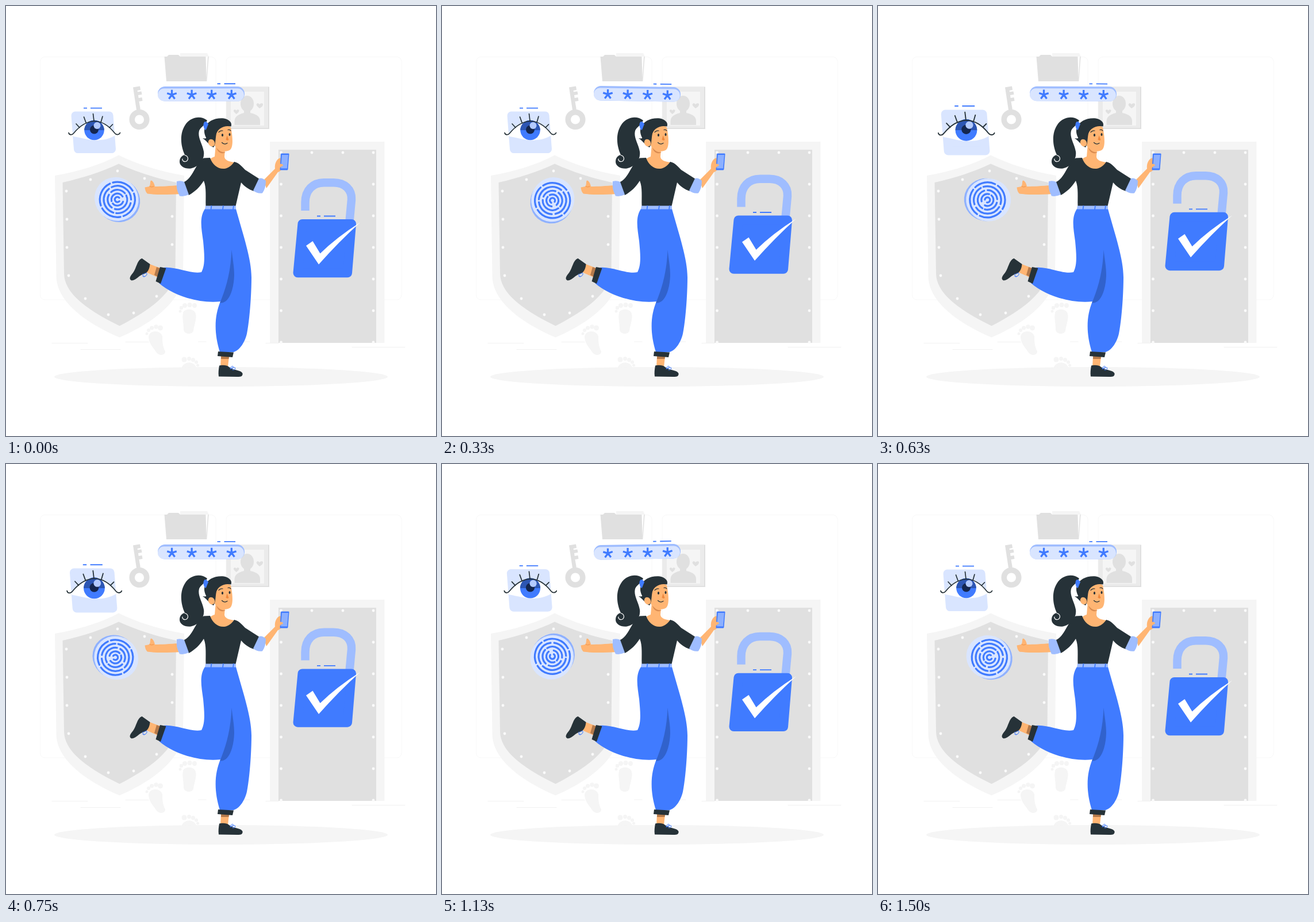
These frames come from a looping animation (748 by 748 pixels, 1540 ms). An HTML page:

```html
<!DOCTYPE html>
<html lang="en">
<head>
<meta charset="utf-8">
<title>Security</title>
<style>
html, body { margin: 0; width: 100%; height: 100%; overflow: hidden; background: #fff; }
svg { display: block; width: 100%; height: 100%; }
.b { fill: #407bff; } .m { fill: #9fbdff; } .l { fill: #d9e5ff; }
.k { fill: #263238; } .s { fill: #ffb573; } .w { fill: #fff; }
.g { fill: #e0e0e0; } .p { fill: #f5f5f5; } .q { fill: #ebebeb; }
.line { fill: none; stroke-linecap: round; stroke-linejoin: round; }
.blue { stroke: #407bff; } .dark { stroke: #263238; }
.dash { fill: none; stroke: #407bff; stroke-width: 1.8; }
</style>
</head>
<body>
<svg viewBox="0 0 748 748">
  <g class="line" stroke="#f8f8f8">
    <rect x="59.500" y="88.500" width="305.500" height="422.500" rx="8"/>
    <rect x="383" y="88.500" width="305" height="422.500" rx="8"/>
  </g>
  <path class="line" stroke="#f1f1f1" d="M80 586.500H142M130 597.500H199M208 584.500H248M335 584H348M410 584H424M452 586.500H474M602 593.500H694"/>

  <!-- folder -->
  <path class="p" d="M303 82H350L353 88L350 131H300z"/>
  <path class="g" d="M275.500 88H280L283 85H300L303 88H352.500L349 131H279z"/>
  <path class="w" d="M347.500 88H351L348.500 125z"/>

  <!-- key -->
  <path class="g" d="M221 141.500L233 139.500L234 146L228.500 147L229 149.500L235.500 148.500L236.500 154L230 155L230.700 160L236.500 159L237.500 165L231.500 166L234 181H227z"/>
  <circle cx="232" cy="197.500" r="12.800" fill="none" stroke="#e0e0e0" stroke-width="9.500"/>

  <!-- portrait -->
  <path class="g" d="M383 140.500H458V214H383z"/>
  <path class="q" d="M383 140.500H456V212H383z"/>
  <path class="p" d="M391 149H449V208H391z"/>
  <g class="g">
    <ellipse cx="419.500" cy="170" rx="11.500" ry="14"/>
    <path d="M414 178H425V186C435 188 442 192 442 200V207H397.500V200C398 192 405 188 414 186z"/>
    <path d="M400.500 188C396 184 395.500 182.500 396 181.500C397 179.500 400 180 400.500 182C401.500 180 404.500 179.500 405.500 181.500C406 183 404 186 400.500 188z"/>
    <path d="M441 178C436 174 435 172 436 170.500C437 168.500 440 169 441 171.500C442 169 446 168.500 447 170.500C447.500 173 445 176 441 178z"/>
  </g>

  <!-- shield -->
  <path class="p" d="M196 259.500C232 277 270 288 310 295L308 467C307 512 255 552 197.500 576.500C140 552 88 515 87.500 470L85 295C125 288 163 277 196 259.500z"/>
  <path class="g" d="M196 274.500C228 289 260 299 296 307L294.500 464C292 500 245 532 197.500 556.500C148 532 102 503 101 466L98.500 307C133 299 166 289 196 274.500z"/>

  <!-- door -->
  <path class="p" d="M459 236H658.500V586H459z"/>
  <path class="g" d="M474 250H644V586H474z"/>
  <g id="rivets" fill="#fafafa"></g>

  <!-- footprints -->
  <g class="p">
    <path d="M308 534C309 526 327 525 330 535C332 545 327 556 326 565C324 572 310 572 309 563C309 552 306 543 308 534z"/>
    <circle cx="328" cy="521" r="4"/><circle cx="319.500" cy="520" r="4"/><circle cx="311" cy="521" r="4"/><circle cx="305" cy="525" r="3.200"/><circle cx="303" cy="531" r="2.500"/>
    <path d="M248 576C248 564 269 562 272 575C272 586 273 593 277 601C277 608 267 609 262 603C256 594 249 588 248 576z"/>
    <circle cx="268.500" cy="560" r="4.500"/><circle cx="261" cy="558" r="3.800"/><circle cx="253.500" cy="560" r="3.500"/><circle cx="248" cy="564" r="3"/><circle cx="245" cy="570" r="2.500"/>
    <path d="M305 632C307 617 329 616 332 632z"/>
    <circle cx="310" cy="615" r="4.500"/><circle cx="318.500" cy="613.500" r="3.500"/><circle cx="325.500" cy="615.500" r="3.500"/><circle cx="331" cy="619.500" r="3"/><circle cx="333.500" cy="625" r="2.500"/>
    <ellipse cx="374" cy="645" rx="290" ry="17"/>
  </g>

  <!-- eye -->
  <g id="eye">
    <path class="line" stroke="#d9e5ff" stroke-width="14" style="fill:#d9e5ff" d="M120.500 190.500H179.500L184 249H125z"/>
    <path class="w" d="M116 223C127 210 139 201 154 200.500C171 201 180 212 189 221L190 225C179 232 166 234 152 233.500C138 232 126 228 117 227z"/>
    <circle class="b" cx="153.500" cy="216" r="17.300"/>
    <path fill="#2d56b3" d="M136.200 216A17.300 17.300 0 0 1 170.800 216z"/>
    <circle fill="#14264f" cx="153.500" cy="215" r="7.500"/>
    <circle fill="#b3caff" cx="158.500" cy="208" r="6"/>
    <path class="line dark" stroke-width="1.700" d="M109 220.500C110 225 115 225 118 221C128 209 139 200.500 154 200.500C170 200.500 181 211 189 221C192 225 197 224 198.500 220.500M151.500 187.500L153 200M168 192L165 202.500M135.500 193L139.500 204M122 205L128 211.500M185.500 206L180 211.500"/>
    <path class="dash" d="M135 177.700H141M147 177.700H167"/>
  </g>

  <!-- fingerprint disc -->
  <g id="disc">
    <ellipse fill="#8fb1ff" cx="195" cy="338" rx="39" ry="37.200" transform="rotate(40 195 338)"/>
    <ellipse class="l" cx="192.300" cy="335.800" rx="39" ry="37.200" transform="rotate(40 192.300 335.800)"/>
    <g id="print" class="line blue" stroke-width="3.200"></g>
  </g>

  <!-- password -->
  <g id="pass">
    <rect class="m" x="264" y="140" width="151" height="25.500" rx="12.500"/>
    <rect class="l" x="264" y="143.500" width="150" height="22" rx="11"/>
    <g id="stars" class="line blue" stroke-width="3.300" style="stroke-linecap:butt"></g>
    <path class="dash" d="M367.500 135.200H373M379.500 135.200H399"/>
  </g>

  <!-- padlock -->
  <g id="lock">
    <path class="line" stroke="#9fbdff" stroke-width="14.500" style="stroke-linecap:butt" d="M520.500 356V342C520.500 320 534 307.300 553 307.300H570C589 307.300 602 319 601 337L597.500 375"/>
    <path class="line blue" stroke-width="16" style="fill:#407bff" d="M515.500 379H601L594 464.300H507.500z"/>
    <path class="w" d="M522 417L533.500 409L546.500 430.500Q575 402.500 616 376.500Q579 410 544 449.500z"/>
    <path class="dash" d="M541 365.500H547M553 365.500H573"/>
  </g>

  <!-- woman: hair and head -->
  <path class="k" d="M350 199C339 190 322 193 313 205C300 223 305 246 311 259C306 260 302 264 302 271C302 279 312 284 322 282.500C337 279 346 267 344 253C341 238 333 229 336 217C338 211 345 209 350 199z"/>
  <path class="line" stroke="#fff" stroke-width="1.200" d="M311 259.500C317 261 318 267 314 270C310 272 306 269 307 266"/>
  <path class="s" d="M365 240L363 262C357 264 355 266 355 268C360 287 385 290 398 272C388 271 380 268 380 262L381 250z"/>
  <path fill="#d98b50" d="M366 246C371 253 376 255 382 254C376 259 368 255 366 246z"/>
  <path class="s" d="M362 216C371 206 386 206 391 211C394 226 396 244 390 250C382 256 368 252 362 241z"/>
  <path class="k" d="M346 212C350 200 364 194 379 195.500C388 197 394 203 391.500 209.500C379 207 369 213 366 222C364 231 365 240 361 246C353 242 351 236 342 230C347 231 349 230 348 229C345 223 344 217 346 212z"/>
  <ellipse class="s" cx="357.500" cy="238" rx="5.500" ry="6.500" transform="rotate(-25 357.500 238)"/>
  <path class="b" d="M346 201C342 204 343 212 347 216C349 215 350 209 352 206C351 203 349 201 346 201z"/>
  <ellipse class="k" cx="376.500" cy="224.500" rx="1.600" ry="2.500"/>
  <ellipse class="k" cx="389" cy="223.500" rx="1.500" ry="2.500"/>
  <path class="line dark" stroke-width="1.200" d="M370 219.500Q373 216 377 217M386 215.500Q389 214.500 391 217M375.500 237.500Q380 242 385 238.500"/>
  <path fill="#ed893e" d="M384.500 225L387.500 233C386 234.500 383.500 233.500 382.500 232.500z"/>

  <!-- arms and phone -->
  <path class="s" d="M301 312C285 313 270 314 259 314C258 309 256 304 252 303.500C250 306 252 311 249 314L241.500 315.500C242 320 243 324 246 326.500C263 329 285 328 303 327z"/>
  <path class="line" stroke="#ed893e" stroke-width=".8" d="M250 314Q253 316 257 314"/>
  <path class="s" d="M448 303L468 283C467 275 470 268 475 265L479 264V275L482 278C480 284 477 288 473 289L453 317z"/>
  <path class="b" d="M479 256.500H491.500Q493 256.500 492.500 258L490.500 284Q490 285.500 489 285.500H477.500Q476 285.500 476.500 284L478 258Q478 256.500 479 256.500z"/>
  <path fill="#8cb0ff" d="M480 259H491L489 282.500H478z"/>
  <path class="s" d="M474 274L480 275C483 276 482 279 479 279L474 284z"/>

  <!-- shirt -->
  <path class="k" d="M344 264.500L355 264C361 283 383 292 397 271C406 273 411 280 416 285L441 301L431 322C422 319 415 314 409 307L399.500 348H347.500C347 333 349 316 344 304C337 315 329 323 318 329C313 322 309 314 308 307C325 301 330 272 344 264.500z"/>
  <path class="m" d="M297 305Q304 303 310 306L318 328Q310 332 302 330.500Q295 318 297 305z"/>
  <path class="m" d="M440 300Q446 298 452 304Q452 317 446 325.500Q437 327 430 321z"/>

  <!-- raised foot -->
  <path class="s" d="M250 449L271 457L266 473L244 463z"/>
  <path fill="#b57a4b" d="M262 454L270 457L266 472L258 468z"/>
  <path class="k" d="M236.500 439L250.500 449C250 456 247 463 242 465.500C232 467 227 477 218.500 477.500C213 475 216 470 221 464C227 456 228 442 236.500 439z"/>
  <path class="line blue" d="M240 466Q246 462 245 467Q243 472 238 470M238 466Q238 474 242 470"/>

  <!-- standing foot -->
  <path class="s" d="M374 609H388L386 628H373z"/>
  <path fill="#b57a4b" d="M374 609H388L387.500 614H374z"/>
  <path class="k" d="M371 625.500C377 624 385 625 388 628C395 634 409 633 411.500 639C412 644 409 645 403 645L370 644.500C369 638 370 631 371 625.500z"/>
  <path class="line blue" d="M390 631Q392 625 395 627Q396 631 390 631Q398 627 399 630Q398 634 394 633"/>

  <!-- trousers -->
  <path class="b" d="M346 353C336 368 340 387 343 409C345 431 347 450 340 463C322 467 296 453 275 455L266 482C290 503 334 518 373 514C362 540 362 570 372 602H396C408 598 416 583 419 570C424 545 427 500 427 472C427 440 413 400 400 353z"/>
  <path fill="#3162cc" d="M392.500 424C391 462 383 491 372 516.500C386 518 396 498 397 468C397 452 394 440 392.500 424z"/>
  <path class="k" d="M268 454L278.500 456L269 483L260.500 479z"/>
  <path class="k" d="M369 601L396 602.500L394 611L368 609z"/>
  <path class="m" d="M347 347.500H400V353.500H346z"/>
  <path class="dash" stroke-width="2.500" d="M357.500 347L356.500 354M378 347L377 354M396 347L395 354"/>
</svg>
<script>
const $ = id => document.getElementById(id);
const LOOP = 1540, CYCLE = 1500, STEPS = 37;

const rivets = [[105, 322], [106, 371], [106, 420], [109, 469], [138, 509], [178, 537],
  [222, 534], [262, 505], [289, 415], [289, 366], [241, 300], [194, 287], [147, 302],
  [532, 255], [586, 255]];
for (let i = 0; i < 7; i++) rivets.push([478.5, 255 + 55 * i], [639, 255 + 55 * i]);
$('rivets').innerHTML = rivets.map(([x, y]) => `<circle cx="${x}" cy="${y}" r="2.4"/>`).join('');

// Point on a circle, angle in degrees
function polar(x, y, r, deg) {
  const a = deg * Math.PI / 180;
  return `${x + r * Math.cos(a)} ${y + r * Math.sin(a)}`;
}

// Five-armed stars
let arms = '';
for (let i = 0; i < 4; i++) {
  const x = 288.5 + 34.6 * i, y = 154.5;
  for (let k = 0; k < 5; k++) arms += `M${x} ${y}L${polar(x, y, 8.7, k * 72 - 90)}`;
}
$('stars').innerHTML = `<path d="${arms}"/>`;

// Broken concentric rings: radius, then start and sweep of each arc in degrees
const rings = [
  [4.5, 40, 275],
  [10.5, 20, 120, 165, 165],
  [17, -25, 130, 125, 85, 230, 90],
  [23.8, 15, 80, 107, 125, 245, 115],
  [30.6, -20, 90, 80, 70, 160, 85, 255, 75]
];
function arc(r, from, sweep) {
  const at = deg => polar(193.8, 336.7, r, deg);
  return `M${at(from)}A${r} ${r} 0 ${sweep > 180 ? 1 : 0} 1 ${at(from + sweep)}`;
}
let ridges = '';
for (const [r, ...arcs] of rings)
  for (let i = 0; i < arcs.length; i += 2) ridges += arc(r, arcs[i], arcs[i + 1]);
$('print').innerHTML = `<path d="${ridges}"/>`;

// Linear keyframes: [position in cycle, value]
const float = [[0, 0], [.5, -15], [1, 0]];
const sway = [[0, 0], [.25, 1], [.75, -1], [1, 0]];
const beat = [[0, 1], [.1, 1.1], [.3, 1], [.4, 1], [.5, 1.1], [.6, 1], [1, 1]];

function value(keys, u) {
  u -= Math.floor(u);
  const i = keys.findIndex(k => k[0] > u);
  const [a, x] = keys[i - 1], [b, y] = keys[i];
  return x + (y - x) * (u - a) / (b - a);
}

const set = (id, t) => $(id).setAttribute('transform', t);

function draw(t) {
  const n = Math.floor(t / LOOP * STEPS + .1) % STEPS;
  const u = n / STEPS + 20 / CYCLE;
  set('lock', `translate(0 ${value(float, u) + .4})`);
  set('pass', `rotate(${value(sway, u)} 339.500 150)`);
  set('disc', `rotate(${360 * n / STEPS} 192 336.500)`);
  set('eye', `translate(154 217) scale(${value(beat, u - 490 / CYCLE)}) translate(-154 -217)`);
}

const start = performance.now();
function tick() {
  draw((performance.now() - start) % LOOP);
  requestAnimationFrame(tick);
}
tick();
</script>
</body>
</html>
```
